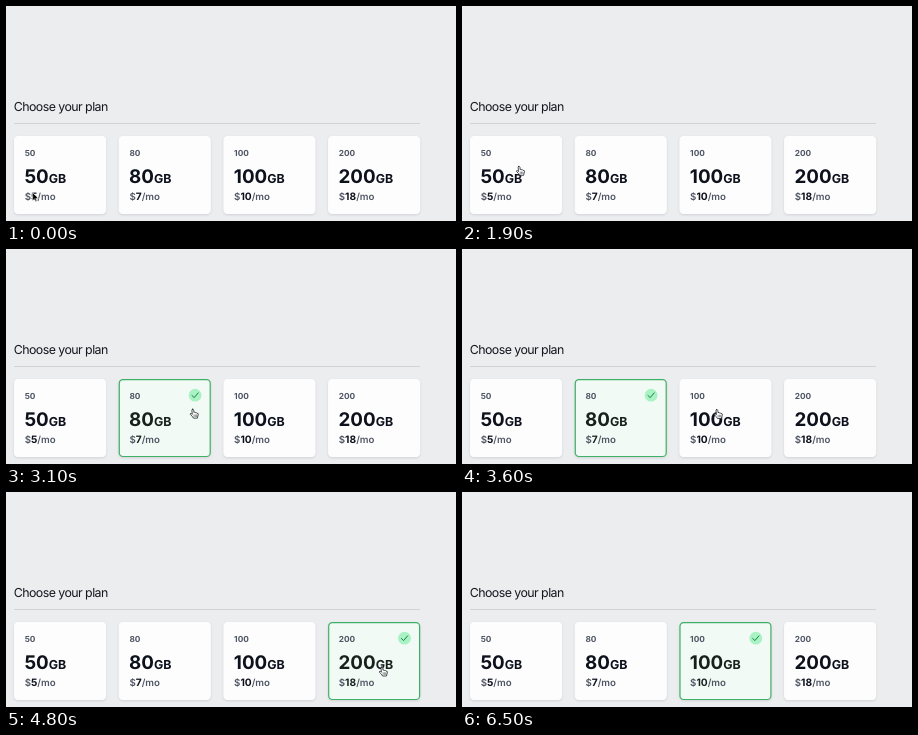
An HTML page for the animation above (6600 ms loop, 450 by 215 pixels).

```html
<!DOCTYPE html>
<html lang="en">
<head>
<meta charset="utf-8">
<title>Choose your plan</title>
<style>
  html, body { margin: 0; width: 100%; height: 100%; overflow: hidden; background: #ecedef; }
  svg { display: block; width: 450px; height: 215px; font-family: Inter, sans-serif; }
  text { text-rendering: geometricPrecision; }
  .title { font-size: 12.4px; letter-spacing: -.045em; fill: #15181f; }
  .box { fill: #fdfdfe; stroke: #fdfdfe; stroke-width: 1.2; filter: drop-shadow(0 1px 1.2px rgba(17, 24, 39, .12)); }
  .label { font-size: 8.3px; font-weight: 650; fill: #4f5663; }
  .size { font-size: 18.8px; font-weight: 700; fill: #0d111c; }
  .unit { font-size: 12.4px; }
  .price { font-size: 9.7px; font-weight: 600; fill: #4f5663; }
  .num { font-size: 10.2px; font-weight: 700; fill: #0d111c; }
  .check { visibility: hidden; }
  .on .check { visibility: visible; }
  .on .box { fill: #f2faf5; stroke: #40b069; }
  .on .size, .on .num { fill: #16211d; }
</style>
</head>
<body>
<svg viewBox="0 0 450 215">
  <text class="title" x="7.7" y="105">Choose your plan</text>
  <path d="M8 117.5H414" stroke="#d0d3d8"/>
  <g id="cards"></g>
  <g id="cursor" stroke-linejoin="round">
    <path id="arrow" d="M.6 .5V8.7L2.5 6.9L3.7 9.7L5 9.1L3.8 6.4H6.3Z" fill="#000" stroke="#fff" stroke-width=".6"/>
    <g id="hand" stroke="#20242b" stroke-width=".8" stroke-linecap="round">
      <path fill="#fff" d="M3 .6Q4.2 .3 4.3 1.4L4.5 3.7Q5.7 3 6 4.1Q7.2 3.6 7.5 4.6Q9 4.4 8.9 5.5L8 9.5H4L2.9 7.7L.8 5.7Q.8 4.4 2 5L2.9 5.7L2.5 1.5Q2.4 .8 3 .6Z"/>
      <path fill="none" stroke-width=".5" d="M4.6 6.2V8M5.9 6.2V8M7.2 6.2V8"/>
    </g>
  </g>
</svg>
<script>
const LOOP = 6600, STEP = 100;
const HAND_AT = 600, GONE_AT = 6500;
const LEFT = 8, PITCH = 104.7;
const plans = [[50, 5], [80, 7], [100, 10], [200, 18]];
const clicks = [2200, 3000, 3800, 4700, 5500];

// The cursor rests at home, then makes each move: [start, end, x, y]
const home = [26, 186];
const moves = [
  [500, 1000, 31.5, 172.5],
  [1500, 2000, 55, 159],
  [2400, 3600, 251.5, 160],
  [3900, 4600, 372.5, 174.5],
  [4800, 5300, 255.5, 175],
  [5500, 5800, 289, 137],
  [5900, 6200, 299.5, 131]
];

const $ = id => document.getElementById(id);
const clamp = p => Math.min(1, Math.max(0, p));
const ease = p => p * p * p * (p * (6 * p - 15) + 10);

$('cards').innerHTML = plans.map(([size, price], i) => `
  <g transform="translate(${LEFT + i * PITCH} 130)">
    <rect class="box" x=".6" y=".6" width="90.9" height="76.9" rx="3.6"/>
    <text class="label" x="10.7" y="19.7">${size}</text>
    <text class="size" x="10.4" y="47">${size}<tspan class="unit">GB</tspan></text>
    <text class="price" x="10.7" y="63.6">$<tspan class="num">${price}</tspan>/mo</text>
    <g class="check">
      <circle cx="76.4" cy="16.2" r="6.4" fill="#a9f2c3"/>
      <path d="M73.3 16.5L75.5 18.6L79.5 13.9" fill="none" stroke="#1c7f45"
        stroke-linecap="round" stroke-linejoin="round"/>
    </g>
  </g>`).join('');
const cards = [...$('cards').children];

function cursorAt(t) {
  return moves.reduce(([x, y], [start, end, toX, toY]) => {
    const p = ease(clamp((t - start) / (end - start)));
    return [x + (toX - x) * p, y + (toY - y) * p];
  }, home);
}

// The picked card is the one under the cursor at the latest click
function pickedAt(t) {
  const click = clicks.filter(c => c <= t).pop();
  return click ? Math.floor((cursorAt(click)[0] - LEFT) / PITCH) : -1;
}

function show(el, visible) {
  el.style.display = visible ? '' : 'none';
}

function draw() {
  const t = Math.floor(performance.now() % LOOP / STEP) * STEP;
  const picked = pickedAt(t);
  cards.forEach((card, i) => card.classList.toggle('on', i === picked));
  $('cursor').setAttribute('transform', `translate(${cursorAt(t)})`);
  show($('cursor'), t < GONE_AT);
  show($('arrow'), t < HAND_AT);
  show($('hand'), t >= HAND_AT);
  requestAnimationFrame(draw);
}
draw();
</script>
</body>
</html>
```
